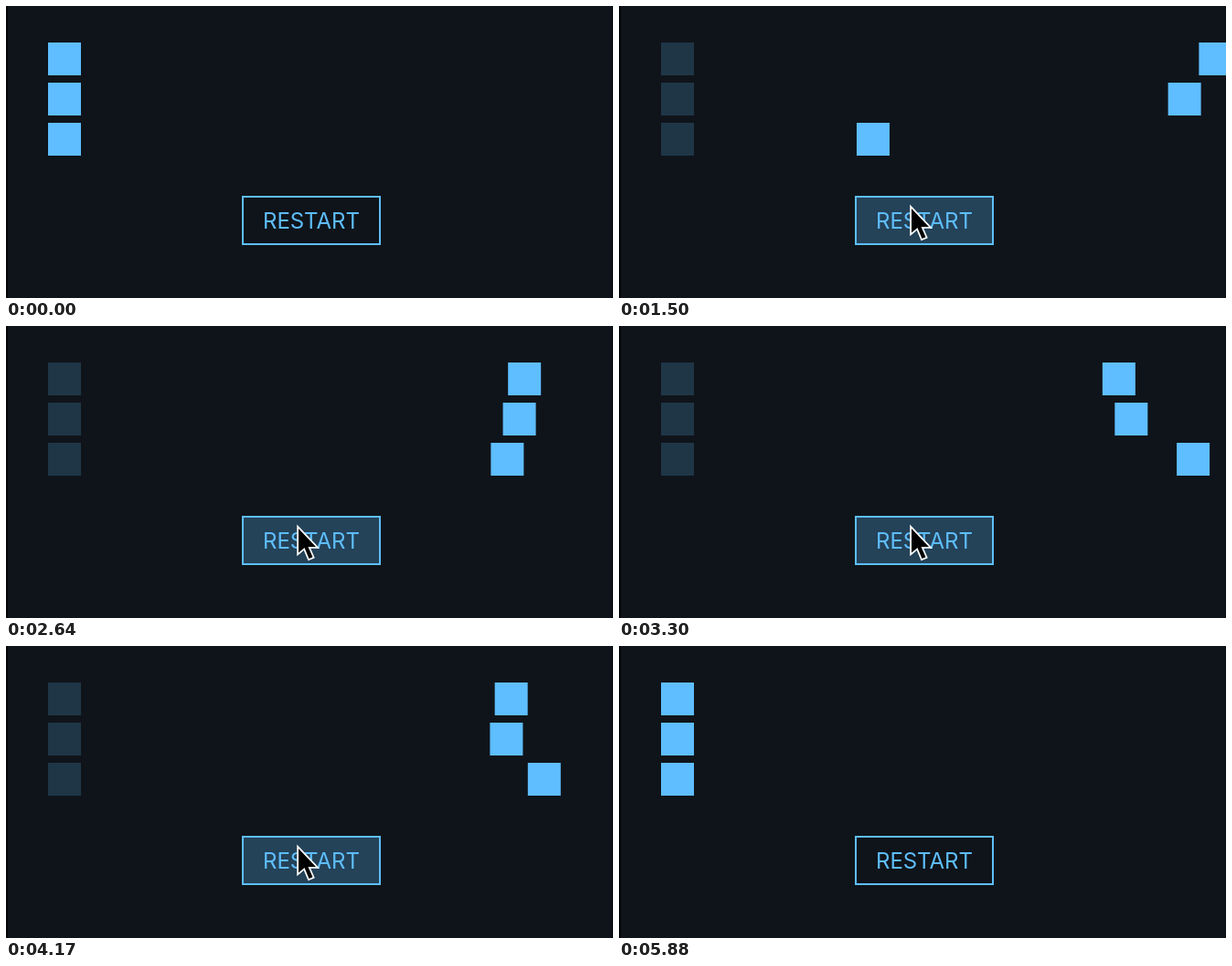
An HTML page with a canvas for the animation above (5.97 s loop, 664 by 320 pixels).

```html
<!DOCTYPE html>
<html lang="en">
<head>
<meta charset="utf-8">
<title>Restart demo</title>
<style>
  html, body { margin: 0; width: 100%; height: 100%; overflow: hidden; background: #0f141a; }
  #stage { position: relative; width: 664px; height: 320px; overflow: hidden; }
  #button {
    position: absolute; left: 258px; top: 208px; width: 152px; height: 54px;
    box-sizing: border-box; border: 2px solid #5ebeff; color: #5ebeff;
    font: 400 24px/51px Inter, Roboto, sans-serif; text-align: center; white-space: nowrap;
  }
  #button.hover { background: rgba(94, 190, 255, .27); }
  canvas { position: absolute; left: 0; top: 0; }
</style>
</head>
<body>
<div id="stage">
  <div id="button">RESTART</div>
  <canvas id="view" width="664" height="320"></canvas>
</div>
<script>
const ctx = document.getElementById('view').getContext('2d');
const button = document.getElementById('button');

const LOOP = 5970, STEP = 30, LAST = 196;
const TICK = 100 / 3;                 // real time per step, ms
const STARTS = [0.55, 42.5, 67, 95.5, 123];
const RUN = 1200, DURATION = 1000, STAGGER = 100, TURN_LAG = 16;
const PRESS = 3;                      // steps the mouse stays down before a restart
const ENTER = [28, 36], LEAVE = [146, 154];
const REST = [319, 220], AWAY = [346, 326];
const BLUE = '#5ebeff';

const clamp = v => Math.min(1, Math.max(0, v));
const elastic = t => t <= 0 ? 0 : t >= 1 ? 1
  : 1 - 2 ** (-10 * t) * Math.cos(4 * Math.PI * t);

// Time inside the alternating animation since the latest restart
function playhead(step) {
  const start = STARTS.filter(s => s <= step).pop();
  if (start === undefined) return 0;
  const time = (step - start) * TICK;
  return time <= RUN ? time : Math.min(RUN, Math.max(0, 2 * RUN + TURN_LAG - time));
}

function drawSquares(time) {
  for (let i = 0; i < 3; i++) {
    const y = 40 + 44 * i;
    const x = 46 + 500 * elastic((time - i * STAGGER) / DURATION);
    ctx.fillStyle = BLUE;
    ctx.globalAlpha = 0.2;
    ctx.fillRect(46, y, 36, 36);
    ctx.globalAlpha = 1;
    ctx.fillRect(x, y, 36, 36);
  }
}

function cursorAt(step) {
  const arrive = clamp((step - ENTER[0]) / (ENTER[1] - ENTER[0]));
  const depart = clamp((step - LEAVE[0]) / (LEAVE[1] - LEAVE[0]));
  const away = Math.max((1 - arrive) ** 2, depart ** 2);
  return REST.map((v, i) => v + (AWAY[i] - v) * away);
}

function polygon(points) {
  ctx.beginPath();
  points.forEach(([x, y]) => ctx.lineTo(x, y));
  ctx.closePath();
}

function drawCursor([x, y], pressed) {
  ctx.save();
  ctx.translate(x, y);
  if (pressed) {
    ctx.beginPath();
    ctx.arc(0, 0, 48, 0, 2 * Math.PI);
    ctx.strokeStyle = 'rgba(0, 0, 0, .75)';
    ctx.lineWidth = 4;
    ctx.stroke();
  }
  polygon([[1, 2], [1, 28.5], [7.5, 23], [12.5, 35], [16.5, 33.3], [11.5, 22], [20, 22]]);
  ctx.lineWidth = 3.5;
  ctx.strokeStyle = '#fff';
  ctx.stroke();
  ctx.fillStyle = '#000';
  ctx.fill();
  ctx.restore();
}

function draw(now) {
  const step = Math.min(LAST, Math.floor((now % LOOP) / STEP));
  const cursor = cursorAt(step);
  const pressed = STARTS.slice(1).some(s => step >= s - PRESS && step < s);

  ctx.clearRect(0, 0, 664, 320);
  ctx.fillStyle = '#030507';
  ctx.fillRect(0, 0, 2, 320);
  ctx.fillStyle = 'rgba(0, 0, 0, .4)';
  ctx.fillRect(663, 0, 1, 320);

  button.classList.toggle('hover', cursor[1] < 262);
  drawSquares(playhead(step));
  if (cursor[1] < 320) drawCursor(cursor, pressed);
}

const origin = performance.now();
function loop() {
  draw(performance.now() - origin);
  requestAnimationFrame(loop);
}
loop();
</script>
</body>
</html>
```
